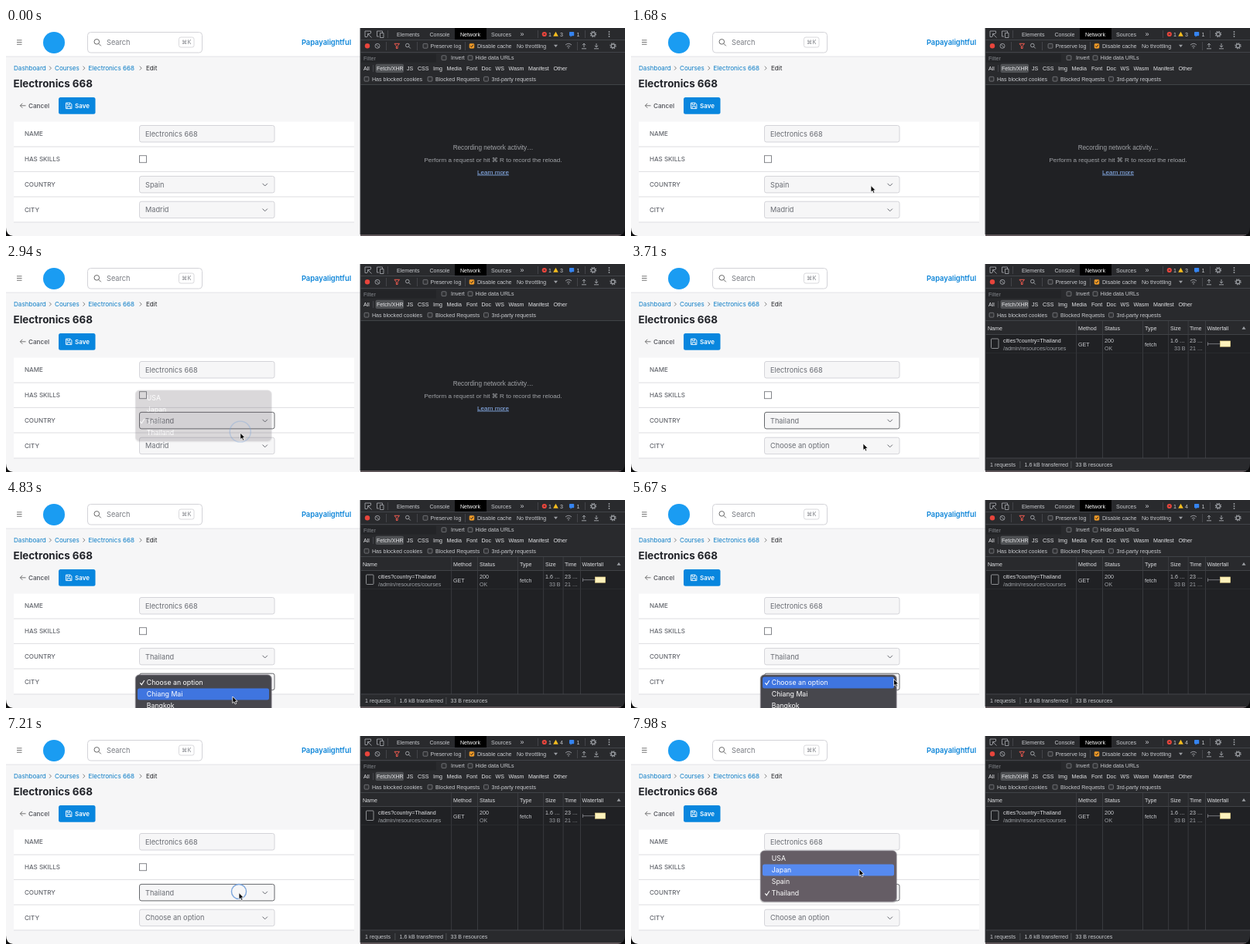
These frames come from a looping animation (800 by 270 pixels, 8000 ms). An HTML page:

```html
<!DOCTYPE html>
<html lang="en">
<head>
<meta charset="utf-8">
<title>Dependent select fields</title>
<style>
  html, body { margin: 0; width: 100%; height: 100%; overflow: hidden; background: #111; }
  svg { display: block; width: 100%; height: 100%; }
  text { white-space: pre; }
  .page { font-family: Inter, sans-serif; }
  .tools { font-family: "Liberation Sans", Arial, sans-serif; }
</style>
</head>
<body>
<svg id="stage" viewBox="0 0 800 270"></svg>
<script>
const LOOP = 8000;
const stage = document.getElementById('stage');

function el(parent, tag, attrs) {
  const node = document.createElementNS('http://www.w3.org/2000/svg', tag);
  for (const key in attrs) node.setAttribute(key, attrs[key]);
  parent.appendChild(node);
  return node;
}
const group = (parent, cls) => el(parent, 'g', cls ? { class: cls } : {});
const rect = (g, x, y, w, h, fill, more) =>
  el(g, 'rect', { x, y, width: w, height: h, fill, ...more });
const path = (g, d, stroke, width = 1, more) =>
  el(g, 'path', { d, stroke, 'stroke-width': width, fill: 'none', ...more });
const disc = (g, cx, cy, r, fill, more) => el(g, 'circle', { cx, cy, r, fill, ...more });
function label(g, x, y, str, size, fill, weight = 400, more) {
  const node = el(g, 'text', { x, y, 'font-size': size, fill, 'font-weight': weight, ...more });
  node.textContent = str;
  return node;
}
const show = (node, on) => node.setAttribute('visibility', on ? 'visible' : 'hidden');

// ---------- page ----------
const page = group(stage, 'page');
const BLUE = '#0b84d8', COURSE = 'Electronics 668';

function buildPage() {
  path(page, 'M0 0H458V270H9Q0 269 0 259Z', 'none', 0, { fill: '#f6f6f7' });
  rect(page, 0, 0, 458, 37, '#fff');
  rect(page, 0, 36.6, 458, .9, '#e2e2e5');
  path(page, 'M14 15.8h6.5M14 18.5h6.5M14 21.2h6.5', '#666', .9);
  disc(page, 62, 19, 14, '#1a9cf2');
  rect(page, 105.5, 5.5, 148, 26.5, '#fff', { rx: 4, stroke: '#d3d3d8' });
  disc(page, 117.3, 17.8, 3.3, 'none', { stroke: '#666' });
  path(page, 'M119.8 20.3l3 3', '#666');
  label(page, 130, 22, 'Search', 9.2, '#777a80');
  rect(page, 223.5, 12, 19.5, 13, '#fff', { rx: 2.5, stroke: '#d0d0d4', 'stroke-width': .8 });
  label(page, 233.2, 21.2, '⌘K', 7.3, '#808389', 400, { 'text-anchor': 'middle' });
  label(page, 414, 22, 'Papayalightful', 9.3, BLUE, 600, { 'text-anchor': 'middle' });

  [[10, 'Dashboard'], [63, 'Courses'], [106.5, COURSE]].forEach(([x, s]) =>
    label(page, x, 55, s, 8.1, '#0a7cc6'));
  label(page, 181, 55, 'Edit', 8.1, '#26272b');
  [56, 99.5, 172.8].forEach(x => path(page, `M${x} 49.6l2.4 2.5l-2.4 2.5`, '#777', .9));
  label(page, 9.5, 76.5, COURSE, 13.4, '#22242a', 700);

  path(page, 'M25.5 100.8H18.5M21.3 97.8l-3 3l3 3', '#666', .9);
  label(page, 29, 104, 'Cancel', 8.1, '#606268', 600);
  rect(page, 68, 90, 47.5, 21.7, '#0886de', { rx: 2.5 });
  path(page, 'M77.5 97.2h5.6l1.8 1.8v5.6h-7.4zM79.2 97.2v2.4h3.2v-2.4M79.2 104.5v-2.8h4v2.8', '#fff', .9);
  label(page, 89, 104, 'Save', 8, '#fff', 600);

  rect(page, 10, 121.5, 440, 131, '#fff');
  [154, 186.3, 219, 252].forEach(y => rect(page, 10, y - .4, 440, .9, '#dadade'));
  ['NAME', 'HAS SKILLS', 'COUNTRY', 'CITY'].forEach((s, i) =>
    label(page, 24, 140.2 + i * 32.9, s, 8, '#62656c', 500));
  rect(page, 172.5, 165.7, 9, 9, '#fff', { stroke: '#77797e', 'stroke-width': .9 });
  field(126.5).value.textContent = COURSE;
}

function field(y, chevron) {
  const box = rect(page, 172.5, y, 174.5, 21.5, '#f6f6f7', { rx: 2.5, stroke: '#d0d0d5', 'stroke-width': .9 });
  const value = label(page, 180, y + 14.2, '', 9.2, '#696c73');
  if (chevron) path(page, `M331.5 ${y + 9.4}l3.2 3.2l3.2 -3.2`, '#666970', 1);
  return { box, value };
}

buildPage();
const country = field(192.4, true);
const city = field(225.2, true);

// ---------- developer tools ----------
const tools = group(stage, 'tools');
const DIM = '#9da0a5', LIGHT = '#c8cace', FS = 7.1;
const say = (g, x, y, s, fill = LIGHT, weight = 400, size = FS) => label(g, x, y, s, size, fill, weight);
const split = (x, y, h) => rect(tools, x, y, .8, h, '#4a4c50');

function checkbox(x, y, on) {
  rect(tools, x - 2.9, y - 2.9, 5.8, 5.8, on ? '#f29b27' : '#303134',
    { rx: 1, stroke: on ? '#f29b27' : '#8b8d91', 'stroke-width': .7 });
  if (on) path(tools, `M${x - 1.7} ${y}l1.3 1.4l2.2 -2.9`, '#222', 1);
}
function gear(x, y) {
  disc(tools, x, y, 2.4, 'none', { stroke: DIM, 'stroke-width': 1.2 });
  disc(tools, x, y, 3.6, 'none', { stroke: DIM, 'stroke-width': 1.2, 'stroke-dasharray': '1.4 1.43' });
}

function buildTools() {
  rect(tools, 458, 0, 342, 270, '#202124');
  rect(tools, 458, 0, 342, 73, '#292a2d');
  rect(tools, 580, 0, 41, 15, '#000');
  [15, 31, 73].forEach(y => rect(tools, 458, y, 342, .8, '#494c50'));
  rect(tools, 457.5, 0, 1, 268, '#44464a');

  path(tools, 'M467 11.5h-3v-7.500h7.500v3M467.500 7.500l5 5M467.500 7.500v3.500M467.500 7.500h3.500', DIM, .9);
  path(tools, 'M482 11h-2.500v-7h7v2M483.500 6.500h4.500v6h-4.500z', DIM, .9);
  split(493, 3, 10);
  [[505, 'Elements'], [547.5, 'Console'], [627, 'Sources']].forEach(([x, s]) => say(tools, x, 10.5, s));
  say(tools, 587, 10.5, 'Network', '#fff');
  say(tools, 664.5, 10.5, '»', LIGHT, 400, 9);
  split(687, 3, 10);
  disc(tools, 695.8, 8, 3.1, '#e8453c');
  path(tools, 'M694.800 7l2 2m0-2l-2 2', '#292a2d', .7);
  say(tools, 701, 10.5, '1');
  path(tools, 'M710.500 4.700l3.300 6h-6.600z', 'none', 0, { fill: '#f5bd1f' });
  rect(tools, 728, 5, 6.2, 5.200, '#3584f0', { rx: .8 });
  path(tools, 'M729.500 10v1.800l2-1.800z', 'none', 0, { fill: '#3584f0' });
  say(tools, 737.5, 10.5, '1');
  split(748, 3, 10);
  gear(759, 8);
  [5, 8, 11].forEach(y => disc(tools, 779.5, y, .9, DIM));

  disc(tools, 467, 23.3, 3.2, '#e8453c');
  disc(tools, 480, 23.3, 3, 'none', { stroke: DIM, 'stroke-width': .9 });
  path(tools, 'M478 21.300l4 4', DIM, .9);
  split(491, 18, 11);
  path(tools, 'M502 20.300h6.500l-2.400 3v3.200h-1.700v-3.200z', '#ee5a4f', 1);
  disc(tools, 518.8, 22.5, 2.3, 'none', { stroke: DIM });
  path(tools, 'M520.500 24.200l2.300 2.300', DIM);
  split(531, 18, 11);
  checkbox(542, 23.3);
  say(tools, 548.5, 25.9, 'Preserve log');
  split(593, 18, 11);
  checkbox(602, 23.3, true);
  say(tools, 609, 25.9, 'Disable cache');
  say(tools, 660, 25.9, 'No throttling');
  path(tools, 'M708 21.800h5l-2.500 3.300z', 'none', 0, { fill: DIM });
  path(tools, 'M723 22q4-3.500 8 0M724.800 24q2.200-1.800 4.400 0', DIM, .9);
  disc(tools, 727, 25.8, .8, DIM);
  split(738, 18, 11);
  path(tools, 'M747 25v-5m-2 2.200l2-2.200l2 2.200M744 26.800h6', DIM);
  path(tools, 'M763 20v5m-2-2.200l2 2.200l2-2.200M760 26.800h6', DIM);
  gear(784.5, 23.3);

  rect(tools, 459, 33.5, 97, 11, '#232427');
  say(tools, 462, 41.6, 'Filter', '#85888d');
  checkbox(566, 38.7);
  say(tools, 575, 41.3, 'Invert');
  checkbox(600, 38.7);
  say(tools, 606.5, 41.3, 'Hide data URLs');

  rect(tools, 477.5, 46.7, 36.5, 11.3, '#505255', { rx: 2 });
  split(474, 48, 9);
  const kinds = [462, 'All', 479, 'Fetch/XHR', 518, 'JS', 532, 'CSS', 552, 'Img', 569.5, 'Media',
    595, 'Font', 614.5, 'Doc', 632.5, 'WS', 649.5, 'Wasm', 675, 'Manifest', 707.5, 'Other'];
  for (let i = 0; i < kinds.length; i += 2) say(tools, kinds[i], 55, kinds[i + 1], '#e4e5e8');

  [[466, 'Has blocked cookies'], [548, 'Blocked Requests'], [620.5, '3rd-party requests']].forEach(([x, s], i) => {
    checkbox(x, 66.2);
    say(tools, x + 7, 68.7, s);
  });
}
buildTools();
const warnings = say(tools, 716, 10.5, '3');

const idle = group(tools);
const mid = { 'text-anchor': 'middle' };
label(idle, 629.5, 157.6, 'Recording network activity…', 8.2, '#a0a3a7', 400, mid);
label(idle, 629.5, 173.6, 'Perform a request or hit ⌘ R to record the reload.', 8.1, '#a0a3a7', 400, mid);
label(idle, 629.5, 189.6, 'Learn more', 8, '#8fb8f8', 400, { ...mid, 'text-decoration': 'underline' });

const log = group(tools);
function buildLog() {
  rect(log, 459, 74, 341, 17, '#292a2d');
  rect(log, 459, 91, 341, .8, '#4a4c50');
  [575.3, 609.2, 661.2, 694.3, 719.7, 742].forEach(x => rect(log, x, 74, .8, 178, '#3f4145'));
  [[461, 'Name'], [578, 'Method'], [612, 'Status'], [664, 'Type'], [697, 'Size'], [722, 'Time'], [744.5, 'Waterfall']]
    .forEach(([x, s]) => say(log, x, 85.5, s, '#dfe0e3'));
  path(log, 'M789.500 84.800h5l-2.500-3.800z', 'none', 0, { fill: DIM });
  rect(log, 465.5, 97, 9.5, 12.5, 'none', { rx: 1, stroke: '#9a9ca0', 'stroke-width': .9 });
  say(log, 481, 101.5, 'cities?country=Thailand', '#dfe0e3');
  say(log, 481, 111.7, '/admin/resources/courses', DIM);
  say(log, 578, 106.5, 'GET');
  say(log, 612, 101.5, '200');
  say(log, 612, 111.7, 'OK', DIM);
  say(log, 664, 106.5, 'fetch');
  say(log, 697, 101.5, '1.6 …');
  say(log, 702, 111.7, '33 B', DIM);
  say(log, 722, 101.5, '23 …');
  say(log, 722, 111.7, '21 …', DIM);
  rect(log, 459, 115, 341, .6, '#303236');
  path(log, 'M745.500 101.500v4.500M745.500 103.700H761', '#8d8f93', .8);
  rect(log, 761.5, 100, 13, 7.2, '#fdf2bd', { stroke: '#e8d48a', 'stroke-width': .7 });
  rect(log, 459, 252, 341, 16, '#292a2d');
  rect(log, 459, 251.6, 341, .8, '#4a4c50');
  say(log, 464, 262.6, '1 requests');
  say(log, 508.5, 262.6, '1.6 kB transferred');
  say(log, 574.5, 262.6, '33 B resources');
  [502.5, 568.5].forEach(x => rect(log, x, 256, .8, 9, '#55575b'));
}
buildLog();
rect(stage, 458, 268, 337, 2, '#5e5559');
path(stage, 'M800 259Q800 269 791 270H800Z', 'none', 0, { fill: '#0a0a0b' });

// ---------- popup menus ----------
const places = ['USA', 'Japan', 'Spain', 'Thailand'];
const menus = [
  { top: 164, items: places, checked: 2, open: 1960, close: 2750, fill: '#655d65', hot: '#568af0' },
  { top: 227, items: ['Choose an option', 'Chiang Mai', 'Bangkok', 'Phuket'], checked: 0,
    open: 4130, close: 6300, fill: '#47474d', hot: '#3f75e0' },
  { top: 149, items: places, checked: 3, open: 7280, close: 9000, fill: '#655d65', hot: '#568af0' }
];
menus.forEach(m => {
  m.g = group(stage, 'page');
  const h = m.items.length * 15 + 6;
  rect(m.g, 166.5, m.top - .5, 177.5, h + 2, '#000', { rx: 5.5, opacity: .18 });
  rect(m.g, 167.5, m.top, 175.5, h, m.fill, { rx: 5, stroke: '#85808a', 'stroke-width': .7 });
  m.bar = rect(m.g, 170, 0, 170, 15, m.hot, { rx: 2.5 });
  m.items.forEach((s, i) => label(m.g, 181.8, m.top + 13.2 + i * 15, s, 8.75, '#fff'));
  const y = m.top + 10.3 + m.checked * 15;
  path(m.g, `M173.300 ${y}l2 2.400l3.500 -5.400`, '#fff', 1.1);
});

// ---------- pointer ----------
const ring = disc(stage, 0, 0, 13.5, 'none', { stroke: '#7da6dc', 'stroke-width': 1.4 });
const pointer = path(stage, 'M0 0V8.600L2 6.900L3.400 10L4.900 9.300L3.600 6.300H6.200Z', '#fff', .8,
  { fill: '#000', 'stroke-linejoin': 'round' });

// time, x, y
const route = [
  [900, 352, 276], [1500, 311.5, 206.5], [1680, 310, 204.5], [1950, 310, 204.5], [2380, 303.6, 217],
  [2800, 303, 218], [3640, 300, 233], [4150, 299.5, 234], [4760, 292.8, 255], [5180, 292.8, 255],
  [6020, 367.6, 219], [6560, 367.6, 219], [7100, 301, 203.5], [7300, 301, 203.5], [7920, 295, 173]
];
const clicks = [1880, 2660, 4060, 6300, 7200];

function pointerAt(t) {
  const i = route.findIndex(k => k[0] > t);
  if (i < 1) return route[i ? route.length - 1 : 0].slice(1);
  const [a, b] = [route[i - 1], route[i]];
  const u = (t - a[0]) / (b[0] - a[0]), e = u * u * (3 - 2 * u);
  return [a[1] + (b[1] - a[1]) * e, a[2] + (b[2] - a[2]) * e];
}
const clamp = v => Math.max(0, Math.min(1, v));

function draw(t) {
  const [x, y] = pointerAt(t);
  pointer.setAttribute('transform', `translate(${x} ${y})`);

  const age = t - (clicks.filter(c => c <= t).pop() ?? -LOOP);
  ring.setAttribute('cx', x);
  ring.setAttribute('cy', y - 1.5);
  ring.setAttribute('r', 9 + 4.5 * clamp(age / 90));
  ring.setAttribute('opacity', clamp((340 - age) / 160));

  menus.forEach(m => {
    show(m.g, t >= m.open && t < m.close + 250);
    m.g.setAttribute('opacity', clamp(1 - (t - m.close) / 250));
    const row = Math.floor((y - m.top - 2.5) / 15);
    const hover = t < m.close && x < 342 && row >= 0 && row < m.items.length;
    m.bar.setAttribute('y', m.top + 2.5 + row * 15);
    m.bar.setAttribute('opacity', hover ? 1 : 0);
  });

  const loaded = t >= 3080;
  country.value.textContent = t < 2750 ? 'Spain' : 'Thailand';
  city.value.textContent = loaded ? 'Choose an option' : 'Madrid';
  const onCity = t >= 4060 && t < 7200;
  country.box.setAttribute('stroke', t >= 1880 && !onCity ? '#55575c' : '#d0d0d5');
  city.box.setAttribute('stroke', onCity ? '#55575c' : '#d0d0d5');
  show(idle, !loaded);
  show(log, loaded);
  warnings.textContent = t < 5180 ? '3' : '4';
}

const start = performance.now();
function tick() {
  draw((performance.now() - start) % LOOP);
  requestAnimationFrame(tick);
}
tick();
</script>
</body>
</html>
```
